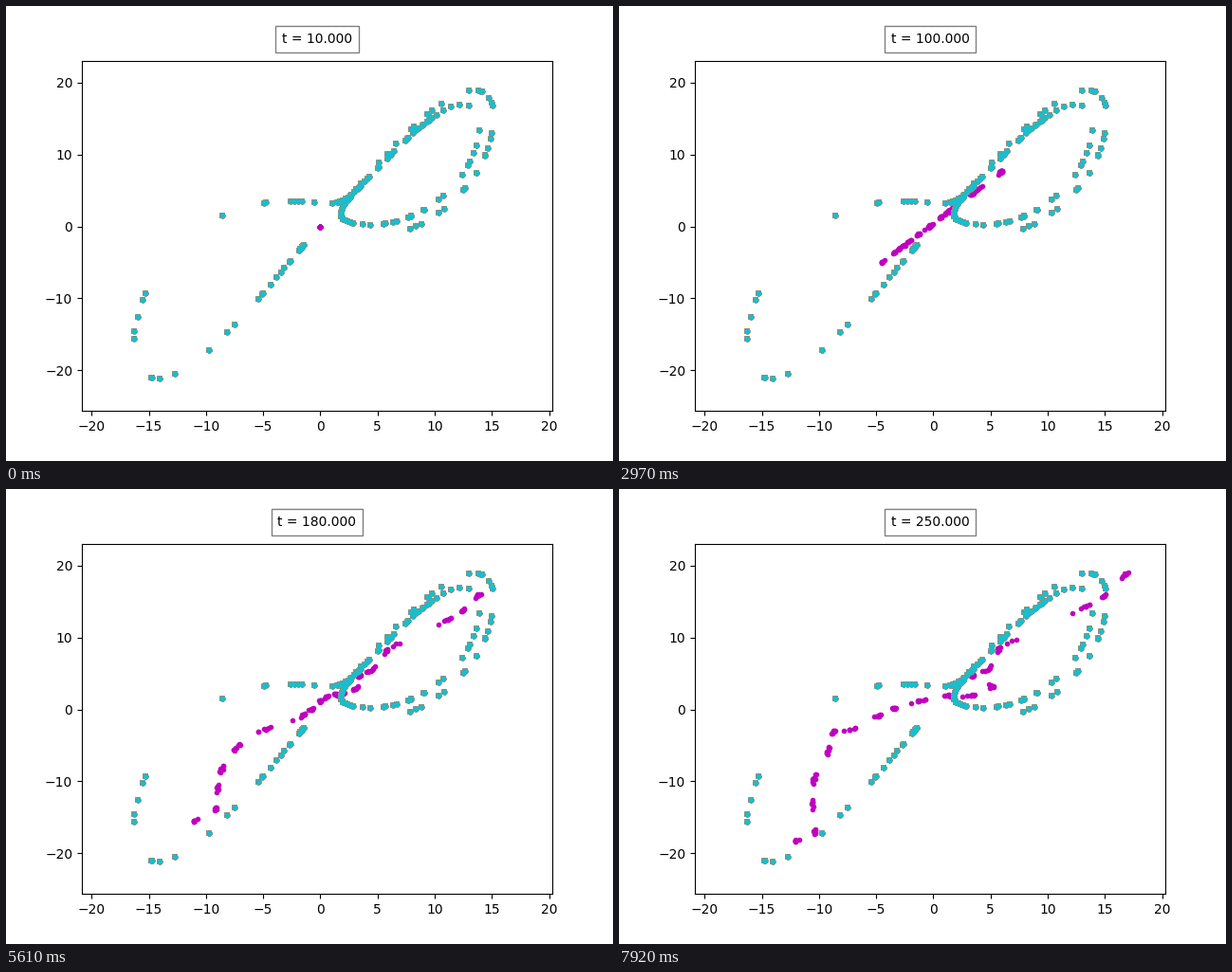
Recreate the animation shown at these times as a matplotlib script. Size 640 by 480 pixels, loop 8 s.

```python
import numpy as np
import matplotlib.pyplot as plt
from matplotlib.animation import FuncAnimation

LOOP, TICK, STEP = 8000, 40, 330
STRAIGHT, LAST = 11, 24      # step of the straight pose, last step
PERIOD = 2.3059

plt.rcParams["text.kerning_factor"] = 6
rng = np.random.default_rng(4)

fig, ax = plt.subplots(figsize=(6.4, 4.8), dpi=100)
ax.set_xlim(-20.85, 20.27)
ax.set_ylim(-25.65, 23.05)


def lorenz(p):
    x, y, z = p
    return np.array([10 * (y - x), x * (28 - z) - y, x * y - 8 / 3 * z])


def trace(p, span, n):
    """Runge-Kutta path of n points over the time span."""
    h = span / n
    path = [np.array(p)]
    for _ in range(n - 1):
        p = path[-1]
        a = lorenz(p)
        b = lorenz(p + h / 2 * a)
        c = lorenz(p + h / 2 * b)
        d = lorenz(p + h * c)
        path.append(p + h / 6 * (a + 2 * b + 2 * c + d))
    return np.array(path)


# Fixed samples of a periodic orbit: one left loop, two right loops
path = trace((12.595115397689, 16.970525307084, 27.0), PERIOD, 2300)
x, y = path[rng.integers(0, len(path), 185), :2].T
crossing = (abs(x - 2.4) < 3.8) & (y < -0.5)
x, y = x[~crossing], y[~crossing]

ax.plot(x, y, "s", ms=4.32, mew=0, color="#7f9f94", zorder=3)
for i in range(10):
    ax.plot(x, y, ".", color=f"C{i}", zorder=3)

# Key points of the swarm: x on the straight pose, then the final (x, y)
KNOTS = np.array([
    (-9.1, -12.1, -18.2), (-7.0, -10.4, -17.2), (-6.1, -10.6, -13.2),
    (-5.3, -10.5, -9.6), (-4.5, -9.3, -6.1), (-2.7, -8.8, -3.0),
    (-0.9, -7.3, -2.8), (-0.4, -4.8, -0.8), (0.7, -3.4, 0.2),
    (1.1, -1.2, 1.2), (1.3, 1.2, 1.9), (1.4, 3.3, 1.9),
    (1.7, 5.2, 3.2), (3.4, 3.2, 4.7), (3.8, 4.8, 5.5),
    (6.0, 5.7, 8.5), (7.1, 13.2, 14.2), (7.9, 15.0, 15.8),
    (8.2, 16.9, 18.9)])

# Dots gather in clumps around the key points
count = len(KNOTS)
spot = np.repeat(np.arange(count), 8) + rng.normal(0, 0.12, 8 * count)
line_x, end_x, end_y = (np.interp(spot, range(count), k) for k in KNOTS.T)
jitter = rng.normal(0, 0.07, (2, spot.size))
pace = 0.55 + 2.5 * np.exp(-((line_x + 0.5) / 2) ** 2)

dots, = ax.plot([], [], "mo", ms=3, zorder=2.5)
label = ax.text(0.5, 1.05, "", transform=ax.transAxes, ha="center",
                bbox={"facecolor": "w", "alpha": 0.5, "pad": 5})


def swarm(step):
    """Stretch along a slanted line, then bend towards the final curve."""
    g = min(1, step / STRAIGHT)
    px = np.where(line_x < 0, line_x * g ** 3.5,
                  np.minimum(line_x, 8.2 * g ** 1.6))
    py = 1.2 * px + 0.6 * g
    u = max(0, (step - STRAIGHT) / (LAST - STRAIGHT)) ** pace
    return np.array([px + (end_x - px) * u, py + (end_y - py) * u]) + g * jitter


def update(frame):
    step = min(LAST, ((frame + 1) * TICK - 10) // STEP)
    dots.set_data(*swarm(step))
    label.set_text(f"t = {10 * (step + 1):.3f}")
    return dots, label


anim = FuncAnimation(fig, update, frames=LOOP // TICK, interval=TICK,
                     repeat=True, repeat_delay=0)
plt.show()
```
